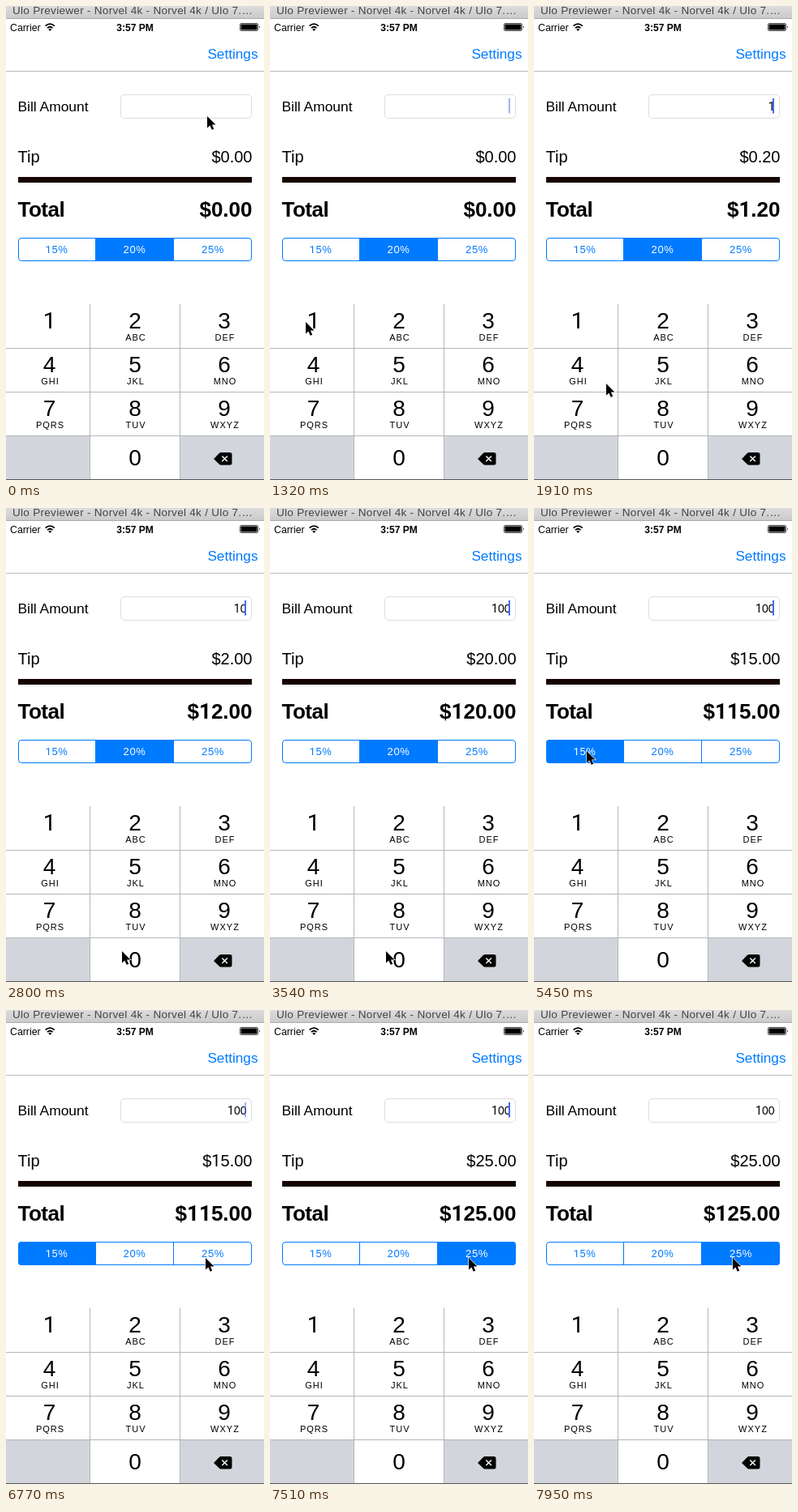
An HTML page for the animation above (8000 ms loop, 318 px wide and 585 px high).

```html
<!DOCTYPE html>
<html lang="en">
<head>
<meta charset="utf-8">
<title>Tip calculator</title>
<style>
html, body { margin: 0; width: 100%; height: 100%; overflow: hidden; background: #fff; }
svg { display: block; width: 318px; height: 585px; font-family: "Liberation Sans", Arial, sans-serif; }
.one { font-family: Roboto, sans-serif; }
.mid { text-anchor: middle; }
.end { text-anchor: end; }
.label { font-size: 17.4px; }
.tip { font-size: 20px; }
.total { font-size: 26px; font-weight: bold; }
.seg { font-size: 13px; letter-spacing: .6px; }
.digit { font-size: 28px; }
.letters { font-size: 11px; letter-spacing: 1px; }
</style>
</head>
<body>
<svg viewBox="0 0 318 585">
  <defs>
    <linearGradient id="bar" x2="0" y2="1">
      <stop stop-color="#dcdcdc"/><stop offset="1" stop-color="#cbcbcb"/>
    </linearGradient>
    <clipPath id="round"><rect x="15" y="286" width="288" height="29" rx="4"/></clipPath>
  </defs>
  <rect width="318" height="585" fill="#fff"/>

  <rect width="318" height="15" fill="url(#bar)"/>
  <rect y="15" width="318" height="1" fill="#aaa"/>
  <text x="8" y="10" font-size="13.5" letter-spacing=".3" fill="#444">Ulo Previewer - Norvel 4k - Norvel 4k / Ulo 7.…</text>

  <text x="5" y="30.5" font-size="12.3">Carrier</text>
  <g fill="none" stroke="#000" stroke-width="1.8">
    <path d="M48.6 24.6Q54.2 19.6 59.8 24.6M50.9 27.2Q54.2 24.2 57.5 27.2"/>
    <path d="M54.2 31L52.2 28.8Q54.2 27.2 56.2 28.8Z" fill="#000" stroke="none"/>
  </g>
  <text x="159" y="30.5" class="mid" font-size="12" font-weight="bold">3:57 PM</text>
  <rect x="288.5" y="21.5" width="22" height="9" rx="1.5" fill="none" stroke="#000" stroke-width=".7"/>
  <rect x="289.5" y="22.5" width="20" height="7" rx=".8"/>
  <path d="M312 24.2q1.8 1.8 0 3.6z"/>

  <text x="310.5" y="64.5" class="end" font-size="17.2" fill="#007aff">Settings</text>
  <rect y="80" width="318" height="1" fill="#b9bbc3"/>

  <text x="14.5" y="130" class="label">Bill Amount</text>
  <rect x="141.5" y="109.5" width="161" height="29" rx="4.5" fill="#fff" stroke="#ddd"/>
  <text id="amount" x="296.5" y="129" class="end" font-size="14"></text>
  <rect id="caret" x="294" y="114" width="2" height="18.5" fill="#426bf2"/>
  <text x="14.5" y="193" class="tip">Tip</text>
  <text id="tip" x="303.5" y="193" class="tip end"></text>
  <rect x="15" y="211" width="288" height="7" fill="#150400"/>
  <text x="14.5" y="259.5" class="total" letter-spacing="-.5">Total</text>
  <text id="total" x="303.5" y="259.5" class="total end"></text>

  <g id="segs" clip-path="url(#round)"></g>
  <path d="M110.5 286V315M206.5 286V315" stroke="#007aff"/>
  <rect x="15.5" y="286.5" width="287" height="28" rx="3.5" fill="none" stroke="#007aff"/>
  <g id="segText"></g>

  <path d="M0 531H103V585H0ZM215 531H318V585H215Z" fill="#d2d5dc"/>
  <rect id="key1" y="368" width="103" height="54" fill="#d2d5dc"/>
  <rect id="key0" x="104" y="531" width="110" height="54" fill="#d2d5dc"/>
  <path d="M103.5 368V585M214.5 368V585M0 422.5H318M0 476.5H318M0 530.5H318" stroke="#b4b6ba"/>
  <rect y="584" width="318" height="1" fill="#555"/>
  <g id="keys"></g>
  <path d="M256 559L262.5 552.2Q263.5 551 265 551H276Q278.500 551 278.500 553.500V564Q278.500 566.500 276 566.500H265Q263.500 566.500 262.500 565.300Z"/>
  <path d="M266.300 555.500l6.600 6.600m0-6.600l-6.600 6.600" stroke="#fff" stroke-width="1.4"/>

  <path id="cursor" d="M0 0V14.500L3.400 11.400L5.700 16.800L8.200 15.700L5.900 10.500H10.400Z" stroke="#fff" stroke-width="1.2" paint-order="stroke"/>
</svg>
<script>
const LOOP = 8000, STEP = 147.2;
const $ = id => document.getElementById(id);
// The digit 1 is set without a foot.
const foot = s => String(s).replace(/1/g, '<tspan class="one">1</tspan>');
const text = (cls, x, y, s) => `<text class="${cls} mid" x="${x}" y="${y}">${foot(s)}</text>`;

const cols = [53.5, 159, 269];
const letters = ['', 'ABC', 'DEF', 'GHI', 'JKL', 'MNO', 'PQRS', 'TUV', 'WXYZ'];
$('keys').innerHTML = letters.map((s, i) => {
  const x = cols[i % 3], y = 398 + 54 * Math.floor(i / 3);
  return text('digit', x, y, i + 1) + text('letters', x + 1, y + 15, s);
}).join('') + text('digit', 159, 567, 0);

const rates = [15, 20, 25];
$('segs').innerHTML = rates.map((_, i) =>
  `<rect x="${15 + 96 * i}" y="286" width="96" height="29" fill="#007aff"/>`).join('');
$('segText').innerHTML = rates.map((r, i) =>
  text('seg', [62.5, 158.5, 255][i], 305, r + '%')).join('');
const fills = [...$('segs').children], labels = [...$('segText').children];

// Pointer stops: step, x, y
const path = [
  [0, 248, 136], [1, 200, 205], [2, 110, 320], [3, 45, 386], [4, 30, 392],
  [5, 30, 392], [6, 39, 391], [7, 44, 390], [12, 44, 390], [13, 89, 466],
  [14, 121, 520], [15, 138, 544], [16, 143, 547], [27, 143, 547], [28, 141, 520],
  [29, 130, 440], [30, 106, 357], [31, 75, 309], [32, 65, 300], [39, 65, 300],
  [40, 82, 301], [41, 145, 305], [42, 222, 308], [43, 246, 306], [49, 246, 306], [50, 245, 306]
];

function pointer(i) {
  const n = path.findIndex(p => p[0] >= i);
  if (n < 0) return path[path.length - 1].slice(1);
  if (n === 0) return path[0].slice(1);
  const a = path[n - 1], b = path[n], k = (i - a[0]) / (b[0] - a[0]);
  return [a[1] + (b[1] - a[1]) * k, a[2] + (b[2] - a[2]) * k];
}

function caret(i) {
  if (i < 3) return 0;
  if (i < 13) return [.5, 1, 1, .5, 0, 0][(i + 3) % 6];
  if (i === 17) return .5;
  if (i === 18) return 0;
  return i < 28 ? 1 : [1, 1, 1, .5, 0, 0][(i - 1) % 6];
}

let last = -1;
function draw(i) {
  const bill = i < 13 ? '' : i < 19 ? '1' : i < 23 ? '10' : '100';
  const chosen = i < 34 ? 1 : i < 51 ? 0 : 2;
  const pressed = i === 33 ? 0 : i === 50 ? 2 : -1;
  const tip = bill * rates[chosen] / 100;
  const money = v => foot('$' + v.toFixed(2));
  const [x, y] = pointer(i);

  $('amount').innerHTML = foot(bill);
  $('tip').innerHTML = money(tip);
  $('total').innerHTML = money(+bill + tip);
  $('caret').setAttribute('opacity', caret(i));
  $('key1').setAttribute('opacity', i === 12 ? 1 : 0);
  $('key0').setAttribute('opacity', [17, 18, 21, 22].includes(i) ? 1 : 0);
  fills.forEach((f, n) => f.setAttribute('opacity', n === chosen ? 1 : n === pressed ? .2 : 0));
  labels.forEach((l, n) => l.setAttribute('fill', n === chosen ? '#fff' : '#007aff'));
  $('cursor').setAttribute('transform', `translate(${x.toFixed(1)} ${y.toFixed(1)})`);
}

function tick() {
  const i = Math.floor((performance.now() % LOOP + 8) / STEP);
  if (i !== last) draw(last = i);
  requestAnimationFrame(tick);
}
tick();
</script>
</body>
</html>
```
